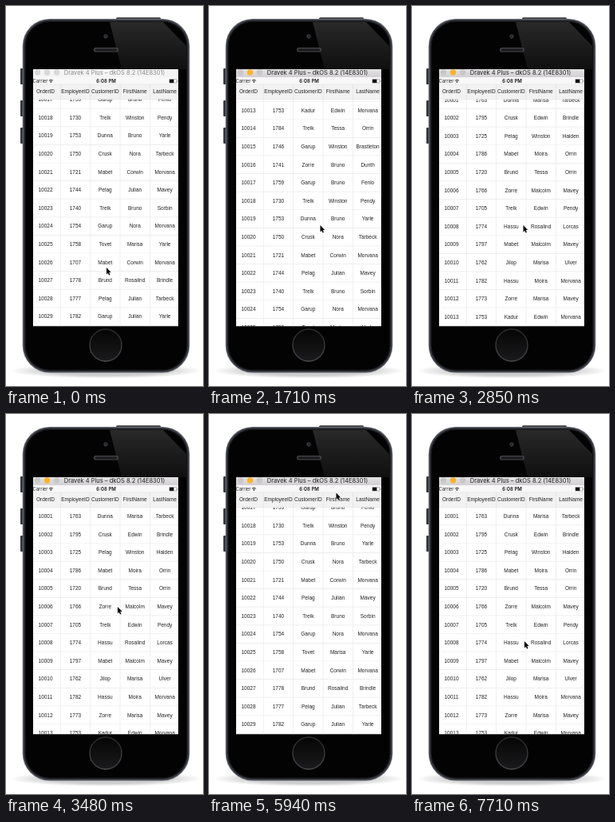
Animation, 247 px wide and 475 px high, one loop 8250 ms. Source, as an HTML page with a canvas:

```html
<!DOCTYPE html>
<html lang="en">
<head>
<meta charset="utf-8">
<title>Order grid on a phone</title>
<style>
  html, body { margin: 0; width: 100%; height: 100%; overflow: hidden; background: #fff; }
  canvas { display: block; width: 247px; height: 475px; }
</style>
</head>
<body>
<canvas id="stage"></canvas>
<script>
const W = 247, H = 475, LOOP = 8250;
const canvas = document.getElementById('stage');
const ctx = canvas.getContext('2d');
const ratio = window.devicePixelRatio || 1;
canvas.width = W * ratio;
canvas.height = H * ratio;

const SANS = '"Liberation Sans", Arial, sans-serif';
const UI = 'Inter, "Liberation Sans", sans-serif';
const SCREEN = { x: 34, y: 79, w: 182, h: 321.5 };
const LIST_TOP = 116.3, ROW = 22.6, END = 372.3;
const COL = 37.4, FIRST_COL = 49.5;
const HEADS = ['OrderID', 'EmployeeID', 'CustomerID', 'FirstName', 'LastName'];

const rows = `1763 Dunna Marisa Tarbeck
1795 Crusk Edwin Brindle
1725 Pelag Winston Halden
1786 Mabet Moira Orrin
1720 Brund Tessa Orrin
1766 Zorre Malcolm Mavey
1705 Trelk Edwin Pendy
1774 Hassu Rosalind Lorcas
1797 Mabet Malcolm Mavey
1762 Jilop Marisa Ulver
1782 Hassu Moira Morvana
1773 Zorre Marisa Mavey
1753 Kadur Edwin Morvana
1784 Trelk Tessa Orrin
1746 Garup Winston Brastleton
1741 Zorre Bruno Dunth
1759 Garup Bruno Fenlo
1730 Trelk Winston Pendy
1753 Dunna Bruno Yarle
1750 Crusk Nora Tarbeck
1721 Mabet Corwin Morvana
1744 Pelag Julian Mavey
1740 Trelk Bruno Sorbin
1754 Garup Nora Morvana
1758 Tovet Marisa Yarle
1707 Mabet Corwin Morvana
1778 Brund Rosalind Brindle
1777 Pelag Julian Tarbeck
1782 Garup Julian Yarle`.split('\n').map((line, i) => [String(10001 + i), ...line.split(' ')]);

// Pointer path: time, x, y
const path = [
  [330, 126, 327], [750, 139.5, 171], [1080, 139.5, 171], [1560, 139.5, 274],
  [3170, 139.5, 274], [3360, 138.5, 243], [3450, 138.5, 243], [3630, 157, 217],
  [4140, 157, 217], [4440, 157, 123.5], [4980, 157, 123.5], [5280, 127, 130],
  [5610, 159.5, 98.5], [5940, 159.5, 98.5], [6090, 155, 147], [6270, 155, 147],
  [6600, 141, 269], [7110, 141, 269], [7400, 131, 278], [7710, 141, 284]
];

const clamp = (v, a, b) => Math.min(b, Math.max(a, v));
const ramp = (t, a, b) => clamp((t - a) / (b - a), 0, 1);
const ease = k => k * k * (3 - 2 * k);
const glide = t => 1 - Math.exp(-Math.max(0, t) / 436);

function pointerAt(t) {
  const i = path.findIndex(p => p[0] > t);
  if (i === 0) return path[0].slice(1);
  if (i < 0) return path[path.length - 1].slice(1);
  const a = path[i - 1], b = path[i], k = ease(ramp(t, a[0], b[0]));
  return [a[1] + (b[1] - a[1]) * k, a[2] + (b[2] - a[2]) * k];
}

// Each scroll is a drag followed by a decaying fling.
function scrollAt(t) {
  let s;
  if (t < 4140) s = END - 103.3 * ease(ramp(t, 1080, 1560)) - 279 * glide(t - 1710);
  else if (t < 6270) s = 93.5 * ease(ramp(t, 4140, 4440)) + 439 * glide(t - 4500);
  else s = END - 122 * ease(ramp(t, 6270, 6600)) - 404 * glide(t - 6620);
  return clamp(s, 0, END);
}

function indicatorAlpha(t) {
  const spans = [[330, 750, 930], [1080, 3400, 3630], [4140, 5000, 5300], [6270, 7150, 7450]];
  const span = spans.find(([a, , c]) => t >= a && t < c);
  return span ? 1 - ramp(t, span[1], span[2]) : 0;
}

function box(x, y, w, h, fill, r = 0) {
  ctx.beginPath();
  ctx.roundRect(x, y, w, h, r);
  ctx.fillStyle = fill;
  ctx.fill();
}

function disc(x, y, r, fill, stroke, width = 1) {
  ctx.beginPath();
  ctx.arc(x, y, r, 0, Math.PI * 2);
  ctx.fillStyle = fill;
  ctx.fill();
  if (stroke) {
    ctx.strokeStyle = stroke;
    ctx.lineWidth = width;
    ctx.stroke();
  }
}

function label(text, x, y, font, color, align = 'center') {
  ctx.font = font;
  ctx.fillStyle = color;
  ctx.textAlign = align;
  ctx.textBaseline = 'alphabetic';
  ctx.fillText(text, x, y);
}

function gradient(x0, y0, x1, y1, ...colors) {
  const g = ctx.createLinearGradient(x0, y0, x1, y1);
  colors.forEach((c, i) => g.addColorStop(i / (colors.length - 1), c));
  return g;
}

function drawShadow() {
  const g = ctx.createRadialGradient(0, 0, 0, 0, 0, 120);
  g.addColorStop(0.6, 'rgba(0,0,0,0.2)');
  g.addColorStop(1, 'rgba(0,0,0,0)');
  ctx.save();
  ctx.translate(125, 456);
  ctx.scale(1, 0.08);
  disc(0, 0, 120, g);
  ctx.restore();
}

function drawGloss() {
  ctx.beginPath();
  [[130, 20], [145, 79], [226, 79], [226, 50], [197, 20]].forEach(([x, y]) => ctx.lineTo(x, y));
  ctx.fillStyle = gradient(0, 20, 0, 79, 'rgba(255,255,255,0.15)', 'rgba(255,255,255,0.05)');
  ctx.fill();
}

function drawPhone() {
  drawShadow();
  box(138, 14.3, 56, 3, '#3c3d42', 1.5);
  [78, 118, 152].forEach(y => box(18, y, 4, 20, '#34353b', 1));
  const shell = (inset, fill) =>
    box(20.7 + inset, 16 + inset, 209.6 - inset * 2, 442.5 - inset * 2, fill, 34 - inset);
  shell(0, '#777a82');
  shell(0.8, '#3b3d44');
  shell(2.6, '#17181b');
  shell(4, '#030303');
  drawGloss();
  disc(125, 38, 2.2, '#22252e', '#484a50', 0.8);
  box(110, 52, 31, 5.6, '#45464a', 2.8);
  box(111.5, 53.2, 28, 3.2, '#1c1c1e', 1.6);
  disc(125, 424, 20, gradient(0, 404, 0, 444, '#050505', '#1b1b1d'),
    gradient(0, 404, 0, 444, '#2b2c2f', '#4b4c50'), 1.3);
}

function drawTitle(active) {
  const { x, y, w } = SCREEN;
  box(x, y, w, 10, active ? gradient(0, y, 0, y + 10, '#e3e1e3', '#d2d0d2') : '#f4f4f4');
  const idle = active ? '#c9c8c9' : '#d8d8d8';
  [idle, active ? '#fdb32c' : idle, idle].forEach((c, i) => disc(39.5 + i * 12, 83, 3.7, c));
  label('Dravek 4 Plus – dkOS 8.2 (14E8301)', 136, 86, '7.5px ' + UI, active ? '#222' : '#8c8c8c');
}

function drawStatus() {
  box(34, 89, 182, 9, '#f8f8f8');
  label('Carrier', 33.4, 95.9, '5.8px ' + UI, '#222', 'left');
  ctx.strokeStyle = '#222';
  ctx.lineWidth = 0.9;
  [1.8, 3.4].forEach(r => {
    ctx.beginPath();
    ctx.arc(56.4, 95.6, r, -Math.PI * 0.77, -Math.PI * 0.23);
    ctx.stroke();
  });
  disc(56.4, 95.2, 0.7, '#222');
  label('6:08 PM', 125.6, 95.9, '600 6px ' + UI, '#111');
  ctx.strokeStyle = '#777';
  ctx.lineWidth = 0.5;
  ctx.strokeRect(204.9, 91.7, 9.2, 4.4);
  box(205, 91.8, 5.4, 4.2, '#111');
  box(214.5, 93, 0.8, 1.8, '#777');
}

function drawColumns(top, height, color) {
  for (let i = 0; i < 4; i++) box(FIRST_COL + COL * (i + 0.5) - 0.3, top, 0.7, height, color);
}

function drawCells(cells, y, color) {
  cells.forEach((text, i) => label(text, FIRST_COL + COL * i, y + 2.3, '6.5px ' + SANS, color));
}

function drawList(scroll) {
  ctx.save();
  ctx.beginPath();
  ctx.rect(34, LIST_TOP, 182, 400.5 - LIST_TOP);
  ctx.clip();
  rows.forEach((cells, i) => {
    const top = LIST_TOP + i * ROW - scroll;
    if (top < LIST_TOP - ROW || top > 401) return;
    drawCells(cells, top + ROW / 2, '#222');
    box(34, top + ROW - 0.35, 182, 0.7, '#e9e9e9');
  });
  drawColumns(LIST_TOP, 285, '#e9e9e9');
  ctx.restore();
}

function drawHeader() {
  box(34, 98, 182, LIST_TOP - 98, '#f2f2f2');
  drawCells(HEADS, 107, '#222');
  drawColumns(98, LIST_TOP - 98, '#e2e2e2');
  box(34, 97.7, 182, 0.6, '#dfdfdf');
  box(34, LIST_TOP - 0.4, 182, 0.7, '#dcdcdc');
}

function drawPointer(x, y) {
  const shape = [[0, 0], [0, 8.4], [1.8, 6.7], [3.1, 9.6], [4.5, 9], [3.2, 6.1], [5.7, 6]];
  ctx.beginPath();
  shape.forEach(([dx, dy]) => ctx.lineTo(x + dx, y + dy));
  ctx.closePath();
  ctx.lineJoin = 'round';
  ctx.lineWidth = 1.2;
  ctx.strokeStyle = '#fff';
  ctx.stroke();
  ctx.fillStyle = '#000';
  ctx.fill();
}

function draw(t) {
  const scroll = scrollAt(t);
  ctx.setTransform(ratio, 0, 0, ratio, 0, 0);
  box(0, 0, W, H, '#fff');
  drawPhone();
  ctx.save();
  ctx.beginPath();
  ctx.rect(SCREEN.x, SCREEN.y, SCREEN.w, SCREEN.h);
  ctx.clip();
  box(SCREEN.x, SCREEN.y, SCREEN.w, SCREEN.h, '#fff');
  drawList(scroll);
  drawTitle(t >= 330);
  drawStatus();
  drawHeader();
  const alpha = indicatorAlpha(t);
  if (alpha > 0) box(215, 118 + scroll / END * 167, 1, 115, `rgba(0,0,0,${0.12 * alpha})`);
  ctx.restore();
  drawPointer(...pointerAt(t));
}

function tick() {
  draw(performance.now() % LOOP);
  requestAnimationFrame(tick);
}
tick();
</script>
</body>
</html>
```
